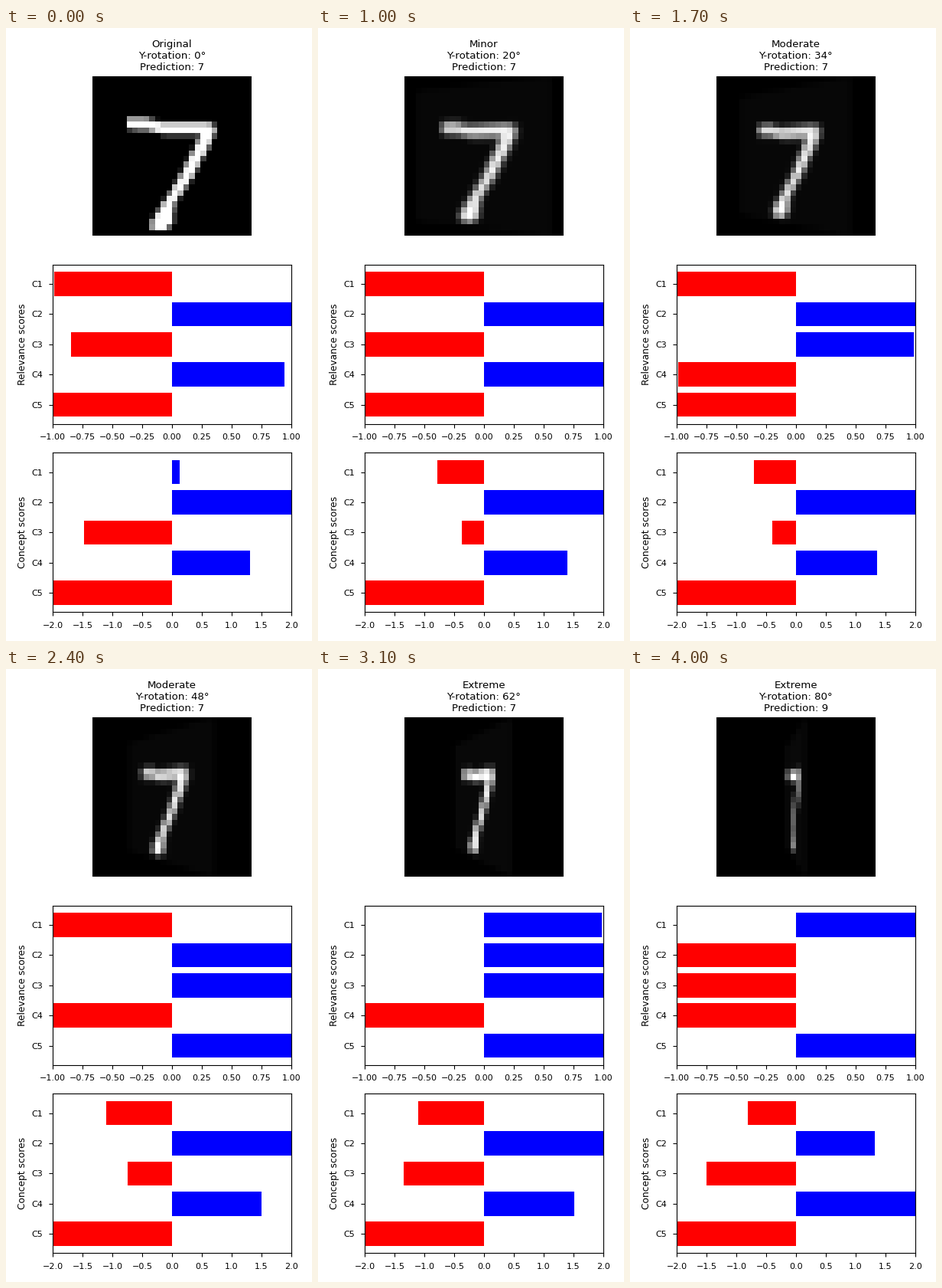
A matplotlib script for the animation above (4.1 s loop, 400x800 px).

```python
import numpy as np
import matplotlib.pyplot as plt
from matplotlib.animation import FuncAnimation
from matplotlib.path import Path

FRAMES, STEP_MS, STEP_DEG = 41, 100, 2
TO_EIGHT, TO_NINE = 34, 38
N, SUB = 28, 5
HALF = N / 2
BACKGROUND = 0.03

plt.rcParams.update({
    "font.family": "DejaVu Sans",
    "axes.titlesize": 9.6,
    "axes.labelsize": 8.8,
    "xtick.labelsize": 8,
    "ytick.labelsize": 8,
    "xtick.major.pad": 5.6,
    "ytick.major.pad": 5.6,
})


def fine_grid():
    """Centres of SUB x SUB points in each of the N x N cells."""
    axis = (np.arange(N * SUB) + 0.5) / SUB
    return np.meshgrid(axis, axis)


def cell_means(fine):
    return fine.reshape(N, SUB, N, SUB).mean(axis=(1, 3))


def draw_seven():
    outline = Path([
        (6, 7.5), (9, 7.3), (12.2, 8.2), (20.5, 8.2), (21.8, 8.9),
        (21.4, 10.5), (17.7, 17.5), (14.4, 22.5), (14.1, 25.9), (12.9, 27),
        (10.5, 27), (10.5, 25.3), (15.5, 17.5), (19.1, 10.2), (12.5, 10.2),
        (10, 9.5), (6, 9.2),
    ])
    x, y = fine_grid()
    inside = outline.contains_points(np.column_stack([x.ravel(), y.ravel()]))
    return cell_means(inside.reshape(x.shape).astype(float))


# One dark cell all around stands for everything outside the picture.
PLATE = np.pad(BACKGROUND + (1 - BACKGROUND) * draw_seven(), 1)


def bilinear(x, y):
    x = np.clip(x + 0.5, 0, N + 1)
    y = np.clip(y + 0.5, 0, N + 1)
    i = np.minimum(x.astype(int), N)
    j = np.minimum(y.astype(int), N)
    u, v = x - i, y - j
    upper = PLATE[j, i] * (1 - u) + PLATE[j, i + 1] * u
    lower = PLATE[j + 1, i] * (1 - u) + PLATE[j + 1, i + 1] * u
    return upper * (1 - v) + lower * v


def rotated(deg):
    """The plate turned about the vertical axis, left side going back."""
    if deg == 0:
        return PLATE[1:-1, 1:-1]
    a = np.radians(deg)
    tilt = 0.66 * np.sin(a)
    shift = -2 * np.sin(2 * a)
    px, py = (g - HALF for g in fine_grid())
    x = (px * (1 + tilt / 2) - shift) / (np.cos(a) + px * tilt / N)
    y = py * (1 + tilt * (HALF - x) / N)
    return cell_means(bilinear(x + HALF, y + HALF))


def prediction(k):
    return 7 + (k >= TO_EIGHT) + (k >= TO_NINE)


def severity(deg):
    if deg == 0:
        return "Original"
    return "Minor" if deg <= 30 else "Moderate" if deg <= 60 else "Extreme"


def swing(start, *turns, jumps=()):
    """A saturated score that changes sign softly at turns, at once at jumps."""
    def score(k):
        value = start
        for t in turns:
            value *= np.tanh((t - k) / 0.8)
        for t in jumps:
            value *= -1 if k >= t else 1
        return value
    return score


def path(*values):
    """A score that runs straight between a few key frames."""
    return lambda k: np.interp(k, (0, 10, 17, 24, 31, 35, 40), values)


RELEVANCE = [
    swing(1, -2.1, 28.9),
    swing(1, jumps=[TO_EIGHT]),
    swing(1, -1, 15, jumps=[TO_EIGHT]),
    swing(-1, -1.4, 15, 34.1, 34.1),
    swing(-1, 21, jumps=[TO_EIGHT, TO_NINE]),
]
CONCEPT = [
    path(0.13, -0.78, -0.7, -1.1, -1.1, -0.97, -0.81),
    lambda k: min(2, 2 - 0.17 * (k - 36)),
    path(-1.47, -0.37, -0.4, -0.74, -1.35, -1.22, -1.5),
    path(1.31, 1.4, 1.36, 1.5, 1.51, 1.87, 2),
    lambda k: -2,
]

fig, (image_ax, *chart_axes) = plt.subplots(3, 1, figsize=(4, 8), dpi=100,
                                            facecolor="white")
image_ax.axis("off")
image = image_ax.imshow(rotated(0), cmap="gray", interpolation="nearest")


def bar_chart(ax, limit, label):
    names = [f"C{i}" for i in range(1, 6)]
    bars = ax.barh(names, [0] * 5)
    ax.set_xlim(-limit, limit)
    ax.set_xticks(np.linspace(-limit, limit, 9))
    ax.invert_yaxis()
    ax.set_ylabel(label)
    return bars


charts = [
    (bar_chart(chart_axes[0], 1, "Relevance scores"), RELEVANCE),
    (bar_chart(chart_axes[1], 2, "Concept scores"), CONCEPT),
]


def update(k):
    deg = k * STEP_DEG
    image.set_data(rotated(deg))
    image.autoscale()
    image_ax.set_title(f"{severity(deg)}\nY-rotation: {deg}°\n"
                       f"Prediction: {prediction(k)}")
    for bars, scores in charts:
        for bar, score in zip(bars, scores):
            value = float(score(k))
            bar.set_width(value)
            bar.set_facecolor("red" if value < 0 else "blue")
    return []


update(0)
fig.tight_layout()
anim = FuncAnimation(fig, update, frames=FRAMES, init_func=lambda: update(0),
                     interval=STEP_MS, repeat=True, repeat_delay=0)
plt.show()
```
